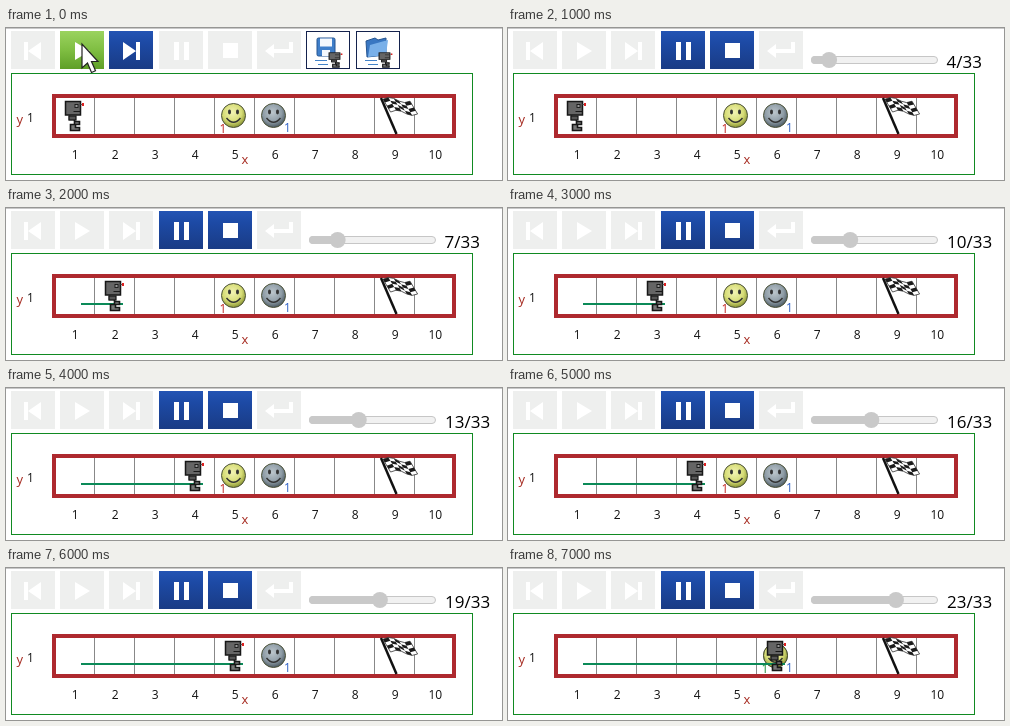
An HTML page for the animation above (8000 ms loop, 496 px wide and 152 px high).

```html
<!DOCTYPE html>
<html lang="en">
<head>
<meta charset="utf-8">
<title>Robot run</title>
<style>
  html, body { margin: 0; width: 100%; height: 100%; overflow: hidden; background: #fff; }
  svg { display: block; width: 496px; height: 152px; font-family: "Open Sans", "Noto Sans", sans-serif; font-size: 12px; }
</style>
</head>
<body>
<svg id="stage" viewBox="0 0 496 152">
  <defs>
    <linearGradient id="blue" x2="0" y2="1">
      <stop stop-color="#2354b4"/><stop offset=".3" stop-color="#1d4aa5"/><stop offset="1" stop-color="#193b85"/>
    </linearGradient>
    <linearGradient id="green" x2="0" y2="1">
      <stop stop-color="#9bd35f"/><stop offset=".5" stop-color="#7fbe42"/><stop offset="1" stop-color="#5f9f28"/>
    </linearGradient>
    <radialGradient id="yellowBall" cx=".45" cy=".38" r=".6">
      <stop stop-color="#f2f3b4"/><stop offset=".65" stop-color="#d6dc76"/><stop offset="1" stop-color="#8f9938"/>
    </radialGradient>
    <radialGradient id="grayBall" cx=".45" cy=".38" r=".6">
      <stop stop-color="#bcc6cc"/><stop offset=".65" stop-color="#8e9ca6"/><stop offset="1" stop-color="#526069"/>
    </radialGradient>
    <g id="face">
      <circle r="12" stroke="#4c5238" stroke-width="1"/>
      <ellipse cx="-4" cy="-3.5" rx="1.5" ry="2.4" fill="#333"/>
      <ellipse cx="4" cy="-3.5" rx="1.5" ry="2.4" fill="#333"/>
      <path d="M-7 2.5Q0 11 7 2.5" fill="none" stroke="#333" stroke-width="1.4"/>
    </g>
    <g id="robot" stroke="#171717">
      <path d="M5.5 15.500V19.500H10.500V24.500H6.500V30.500H15.500V27.500H11.500V24.500H15.500V21.500H10.500" fill="#777" stroke-width="1.6"/>
      <rect x="1.500" y="1.500" width="15" height="13.500" fill="#656565" stroke-width="1.5"/>
      <path d="M16.500 4.500H19" stroke="#555"/>
      <rect x="18" y="3" width="2" height="3" fill="#d22" stroke="none"/>
      <rect x="11" y="4.500" width="3" height="3" fill="#999" stroke-width=".9"/>
      <path d="M9.500 11.500H16" stroke-width="1"/>
      <rect x="5" y="16" width="7" height="4" fill="#555" stroke-width="1.2"/>
    </g>
    <g id="first"><path d="M13 11h4v18h-4zM30 11v18L17 20z"/></g>
    <g id="play"><path d="M15 11v18l15-9z"/></g>
    <g id="last"><path d="M14 11v18l13-9zM27 11h4v18h-4z"/></g>
    <g id="pause"><path d="M15 11h5v18h-5zM25 11h5v18h-5z"/></g>
    <g id="stop"><path d="M15 12h15v15H15z"/></g>
    <g id="enter"><path d="M8 20l9-7v5h15v-7h4v11H17v5z"/></g>
  </defs>
  <rect width="496" height="152" fill="#fff"/>
  <path d="M0 .5H496" stroke="#c8c8c8"/>
  <g id="buttons"></g>
  <g id="files">
    <g fill="#fff" stroke="#14224d">
      <rect x="300.500" y="3.500" width="43" height="37"/>
      <rect x="350.500" y="3.500" width="43" height="37"/>
    </g>
    <rect x="311" y="10" width="18" height="18" rx="1.500" fill="#3f7fca" stroke="#265590"/>
    <path d="M314 10.500h12v8h-12zM316 22h8v6h-8z" fill="#f4f8fd"/>
    <path d="M360 13l9-3 3 2 8-2v17l-19 2z" fill="#3977c2" stroke="#265590"/>
    <path d="M364 17l18-5-2 15-18 2z" fill="#79b0e9"/>
    <path d="M309 32.500h12M312 36.500h10M359 32.500h12M362 36.500h10" stroke="#4383c8"/>
    <use href="#robot" transform="translate(322 24) scale(.72 .5)"/>
    <use href="#robot" transform="translate(372 24) scale(.72 .5)"/>
    <path d="M76 16v24l5.500-5 4 9.500 4-1.700-4-9.300H92z" fill="#fff" stroke="#222" stroke-width="1.200"/>
  </g>
  <g id="slider">
    <rect x="303.500" y="28.500" width="126" height="7" rx="3.500" fill="#f1f1f1" stroke="#c6c6c6"/>
    <rect id="fill" x="303" y="28" height="8" rx="4" fill="#c9c9c9"/>
    <circle id="thumb" cy="32" r="8" fill="#c9c9c9"/>
    <text id="count" y="40" font-size="17"></text>
  </g>
  <rect x="5.500" y="45.500" width="461" height="101" fill="none" stroke="#118a22"/>
  <g id="grid" stroke="#888"></g>
  <g id="labels" text-anchor="middle" fill="#111"></g>
  <g font-size="13" fill="#a5281e"><text x="10.500" y="96">y</text><text x="235.500" y="136">x</text></g>
  <text x="21" y="94" fill="#111">1</text>
  <rect x="48" y="68" width="400" height="40" fill="none" stroke="#ae292e" stroke-width="4"/>
  <g id="flag">
    <path d="M375 70L390.500 106" stroke="#111" stroke-width="2.500"/>
  </g>
  <use href="#face" x="267.500" y="87.500" fill="url(#grayBall)"/>
  <use id="ball" href="#face" y="87.500" fill="url(#yellowBall)"/>
  <text x="278" y="104" fill="#2d5fc4">1</text>
  <text id="tag" y="105">1</text>
  <path id="trail" stroke="#0b8a58" stroke-width="2"/>
  <use id="walker" href="#robot" y="72"/>
</svg>
<script>
const $ = id => document.getElementById(id);
const set = (el, attrs) => { for (const k in attrs) el.setAttribute(k, attrs[k]); return el; };
const add = (parent, tag, attrs) =>
  parent.appendChild(set(document.createElementNS("http://www.w3.org/2000/svg", tag), attrs));
const show = (el, on) => set(el, { visibility: on ? "visible" : "hidden" });

const LOOP = 8000, STEP = 1000;
// program step, robot cell, cell of the yellow ball (0 = carried)
const steps = [
  [0, 1, 5], [4, 1, 5], [7, 2, 5], [10, 3, 5],
  [13, 4, 5], [16, 4, 5], [19, 5, 0], [23, 6, 6]
];
const idle = ["", "green", "blue", "", "", ""];
const running = ["", "", "", "blue", "blue", ""];

const buttons = ["first", "play", "last", "pause", "stop", "enter"].map((icon, i) => {
  const x = Math.round(5 + 49.2 * i);
  const back = add($("buttons"), "rect", { x, y: 3, width: 44, height: 38 });
  add($("buttons"), "use", { href: "#" + icon, x, y: 3, fill: "#fff" });
  return back;
});

for (let n = 1; n <= 10; n++) {
  if (n < 10) add($("grid"), "path", { d: `M${48.5 + 40 * n} 70V106` });
  add($("labels"), "text", { x: 29.3 + 40 * n, y: 131 }).textContent = n;
}

// waving chequered cloth
const wave = (c, r) => `${377 + 5.4 * c + 1.9 * r} ${72 + 3.2 * r - 2.6 * Math.sin(c * 1.1 + 0.3)}`;
const edge = r => [0, 1, 2, 3, 4, 5].map(c => wave(c, r));
add($("flag"), "path", {
  d: "M" + [...edge(0), ...edge(4).reverse()].join("L") + "Z", fill: "#fff", stroke: "#333", "stroke-width": 0.8
});
for (let r = 0; r < 4; r++)
  for (let c = r % 2; c < 5; c += 2)
    add($("flag"), "path", {
      d: "M" + [wave(c, r), wave(c + 1, r), wave(c + 1, r + 1), wave(c, r + 1)].join("L") + "Z", fill: "#1b1b1b"
    });

let shown = -1;
function draw(now) {
  const i = Math.floor((now % LOOP) / STEP);
  if (i !== shown) {
    shown = i;
    const [count, cell, ball] = steps[i];
    const thumb = 307 + 3.52 * count;
    (i ? running : idle).forEach((name, k) => set(buttons[k], { fill: name ? `url(#${name})` : "#eeefee" }));
    show($("files"), !i);
    show($("slider"), i);
    set($("fill"), { width: thumb - 303 });
    set($("thumb"), { cx: thumb });
    set($("count"), { x: count < 10 ? 438.5 : 439 }).textContent = count + "/33";
    show($("ball"), ball);
    show($("tag"), ball);
    set($("ball"), { x: 27.5 + 40 * ball });
    set($("tag"), { x: 13.5 + 40 * ball, fill: ball === cell ? "#1c8a35" : "#c0251f" });
    set($("trail"), { d: cell > 1 ? `M75 96H${37 + 40 * cell}` : "M0 0" });
    set($("walker"), { x: 18 + 40 * cell });
  }
}
function tick() {
  draw(performance.now());
  requestAnimationFrame(tick);
}
tick();
</script>
</body>
</html>
```
